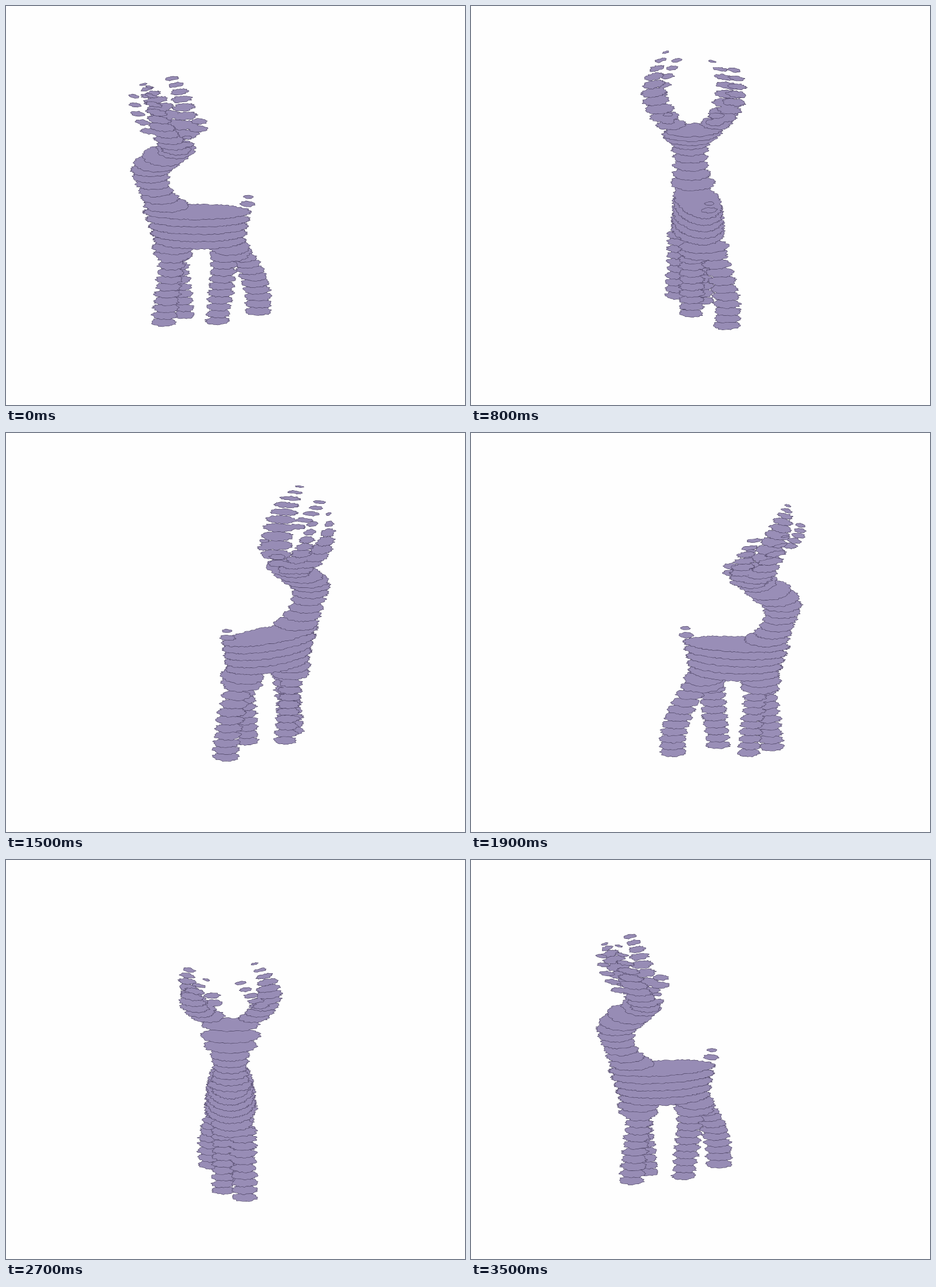
Recreate the animation shown at these times as an HTML page with a canvas. Size 802x698 px, loop 3.6 s.

```html
<!DOCTYPE html>
<html lang="en">
<head>
<meta charset="utf-8">
<title>Turning sliced deer</title>
<style>
html, body { margin: 0; width: 100%; height: 100%; overflow: hidden; background: #fefefe; }
canvas { display: block; }
</style>
</head>
<body>
<canvas id="stage" width="802" height="698"></canvas>
<script>
const ctx = document.getElementById('stage').getContext('2d');
const LOOP = 3600, STEP = 100, TURN = Math.PI / 18;
const CENTRE = 400, GROUND = 547, GAP = 12.27, TILT = 0.345, MIDLINE = -8;
const layers = [];

const rough = n => {
  const s = Math.sin(n * 12.9898 + 4.1) * 43758.5453;
  return s - Math.floor(s) - 0.5;
};

// Ragged ellipse in the horizontal plane: u forward, v to the left
function outline(u, v, r, ratio, spin, seed) {
  const n = Math.max(18, Math.round(r * 1.8));
  const jag = Math.min(6, r * 0.35), c = Math.cos(spin), s = Math.sin(spin);
  return Array.from({ length: n }, (_, i) => {
    const a = i / n * 2 * Math.PI, off = jag * rough(seed * 97 + i);
    const p = Math.cos(a) * (r + off), q = Math.sin(a) * (r * ratio + off);
    return [u + p * c - q * s, v + p * s + q * c];
  });
}

// Slices along a bowed path; both ends are [forward, left of midline, radius, width ratio]
function limb(low, high, start, end, bow = [], spin = 0) {
  for (let k = low; k <= high; k++) {
    const f = (k - low) / (high - low), arc = 4 * f * (1 - f);
    const at = (i, rest = 0) => {
      const a = start[i] ?? rest, b = end[i] ?? rest;
      return a + (b - a) * f + (bow[i] ?? 0) * arc;
    };
    const layer = layers[k] ??= [];
    layer.push(outline(at(0), MIDLINE + at(1), at(2), at(3, 1), spin, k * 20 + layer.length));
  }
}

function antler(side, high, reach) {
  limb(25, high, [102, side * 41, 26, 0.9], [reach, side * 42, 7, 0.45],
    [4, side * 26, 8], -side * Math.PI / 4);
}

// Legs
limb(0, 9, [124, 25, 21], [110, 22, 23]);
limb(0, 9, [90, -12, 19], [103, -12, 19]);
limb(0, 9, [30, 18, 20], [18, 18, 23]);
limb(0, 9, [-41, -32, 22], [-5, -14, 24], [-11, -8]);
// Shoulders, hips, trunk, tail
limb(9, 10, [108, 2, 33], [108, 2, 35]);
limb(9, 10, [9, -1, 33, 1.2], [9, -1, 34, 1.25]);
limb(11, 15, [62, 1, 79, 0.56], [66, 0, 93, 0.41]);
limb(16, 17, [-22, -5, 13], [-24, -5, 8]);
// Neck, head, ears
limb(16, 20, [120, 0, 38], [147, 0, 31], [5, 0, -5]);
limb(21, 24, [147, 0, 34], [103, 0, 33, 1.5], [5, 0, 6]);
limb(26, 27, [83, 50, 11], [83, 50, 8]);
limb(26, 27, [64, -30, 15], [62, -32, 13]);
// Antlers and their side branches
antler(1, 34, 150);
antler(-1, 32, 160);
limb(28, 32, [150, 53, 16, 0.7], [177, 18, 10, 0.7], [6], -Math.PI / 4);
limb(25, 32, [88, -34, 26, 0.8], [110, -72, 12, 0.65], [-8, -18, 1], Math.PI / 4);

function draw(angle) {
  const c = Math.cos(angle), s = Math.sin(angle);
  const light = Math.max(0, Math.cos(angle - Math.PI * 1.25)) ** 8;
  const shade = [151, 140, 181].map(x => Math.round(x + 10 * light));
  ctx.fillStyle = '#fefefe';
  ctx.fillRect(0, 0, 802, 698);
  ctx.fillStyle = `rgb(${shade})`;
  ctx.strokeStyle = '#4b4262';
  ctx.lineWidth = 1.3;
  ctx.lineJoin = 'round';
  layers.forEach((loops, k) => {
    ctx.beginPath();
    for (const loop of loops) {
      loop.forEach(([u, v], i) => {
        const x = CENTRE - u * c - v * s;
        const y = GROUND - k * GAP + (v * c - u * s) * TILT;
        i ? ctx.lineTo(x, y) : ctx.moveTo(x, y);
      });
      ctx.closePath();
    }
    ctx.stroke();
    ctx.fill();
  });
}

function tick() {
  draw(Math.floor(performance.now() % LOOP / STEP) * TURN);
  requestAnimationFrame(tick);
}
tick();
</script>
</body>
</html>
```
